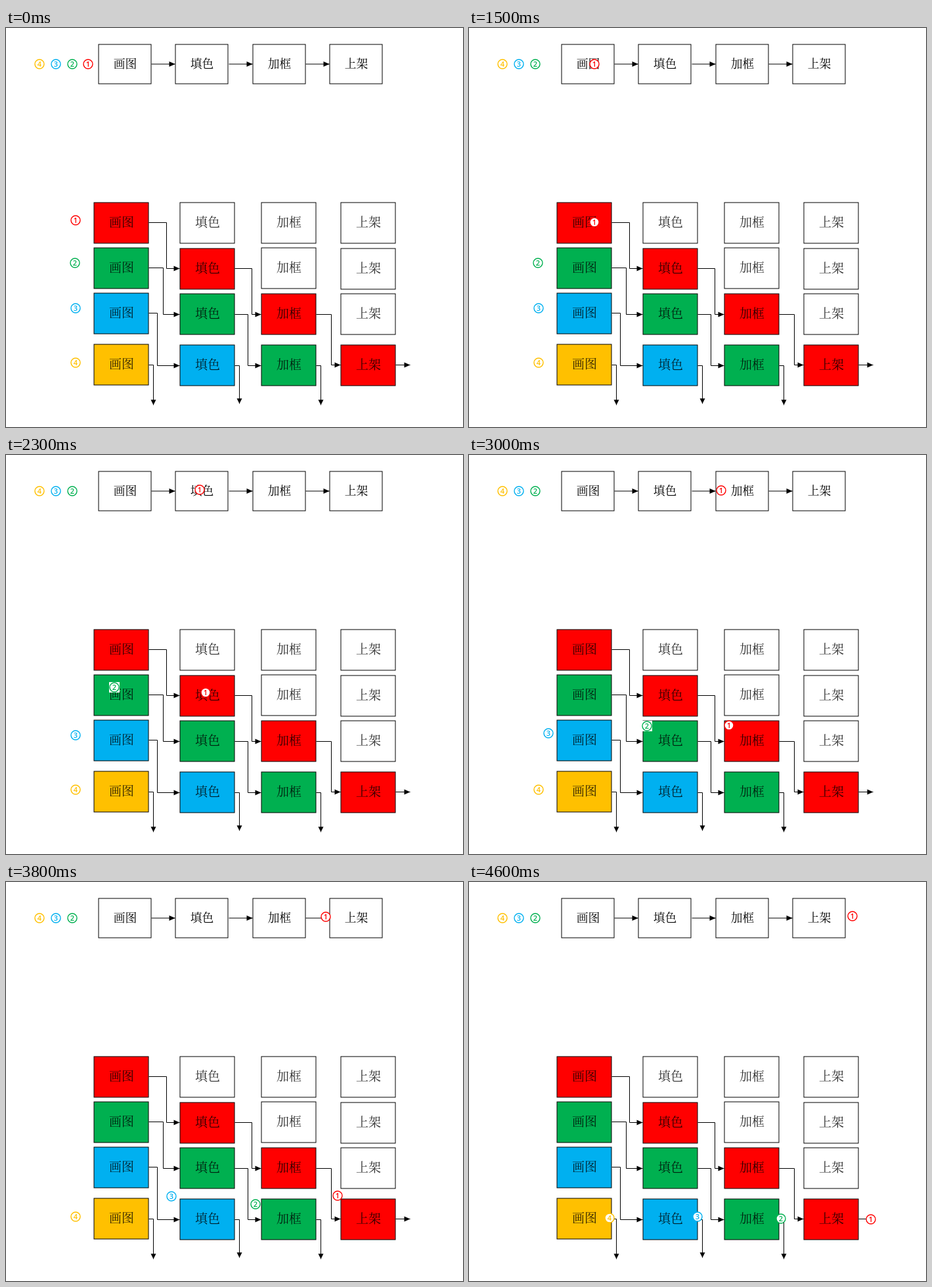
Animation of 696 by 608 pixels, one loop 6.1 s. Source, as an HTML page:

```html
<!DOCTYPE html>
<html lang="zh-CN">
<head>
<meta charset="utf-8">
<title>流水线</title>
<style>
  html, body { margin: 0; width: 100%; height: 100%; overflow: hidden; background: #fff; }
  svg { display: block; width: 696px; height: 608px; }
  .box { stroke: #000; stroke-width: 1; }
  .wire { fill: none; stroke: #000; stroke-width: 1; }
  .label {
    font-family: "Noto Serif CJK SC", "Noto Sans CJK SC", "Noto Sans CJK", serif;
    font-weight: 300; text-anchor: middle; fill: #000;
  }
  .lower { fill-opacity: .82; }
  .ring { fill: #fff; stroke-width: 1.4; }
  .digit { font: 600 11px "Open Sans", "Noto Sans", sans-serif; text-anchor: middle; }
</style>
</head>
<body>
<svg id="stage" viewBox="0 0 696 608"></svg>
<script>
const NS = "http://www.w3.org/2000/svg";
const stage = document.getElementById("stage");
const RED = "#ff0000", GREEN = "#00b050", BLUE = "#00b0f0", GOLD = "#ffc000";
const colors = [RED, GREEN, BLUE, GOLD];
const names = ["画图", "填色", "加框", "上架"];

function add(tag, attrs, parent = stage, text = "") {
  const el = document.createElementNS(NS, tag);
  for (const key in attrs) el.setAttribute(key, attrs[key]);
  el.textContent = text;
  parent.appendChild(el);
  return el;
}

function box(x, y, w, h, fill) {
  add("rect", { class: "box", x: x + .5, y: y + .5, width: w, height: h, fill });
}

function label(x, y, size, text, cls = "") {
  add("text", { class: "label " + cls, x, y: y + size * .38, "font-size": size }, stage, text);
}

// Polyline with a filled head at its last point
function arrow(points, len) {
  const [x, y] = points[points.length - 1];
  const down = points[points.length - 2][0] === x;
  const path = points.map(([px, py]) => `${px + .5},${py + .5}`).join(" ");
  add("polyline", { class: "wire", points: path });
  const turn = down ? " rotate(90)" : "";
  add("path", { d: `M0 0L${-len} -4V4Z`, transform: `translate(${x + .5} ${y + .5})${turn}` });
}

function elbow(x1, y1, mid, x2, y2) {
  arrow([[x1, y1], [mid, y1], [mid, y2], [x2, y2]], 9);
}

function badge(n, x, y) {
  const color = colors[n - 1];
  const g = add("g", { transform: `translate(${x} ${y})` });
  g.plate = add("rect", { x: -8, y: -8, width: 16, height: 16, fill: "#fff", visibility: "hidden" }, g);
  add("circle", { class: "ring", r: 7, stroke: color }, g);
  add("text", { class: "digit", y: 4, fill: color }, g, n);
  return g;
}

// Upper row
[141, 258, 376, 493].forEach((x, i) => {
  box(x - .5, 24.5, 80, 60, "#fff");
  label(x + 40.5, 54.5, 17.8, names[i]);
  if (i) arrow([[x - 37, 54.5], [x - 1, 54.5]], 9);
});

// Lower grid
const cols = [134, 265, 389, 510];
const rows = [[266, 335, 404, 482], [266, 336, 405, 483], [266, 335, 405, 483], [266, 336, 405, 483]];
cols.forEach((x, c) => rows[c].forEach((y, r) => {
  box(x - .5, y - .5, 83, 62, r < c ? "#fff" : colors[r - c]);
  label(x + 42, y + 30, 19, names[c], "lower");
}));

elbow(217, 296, 244, 264, 366);
elbow(348, 366, 374, 388, 436);
elbow(472, 436, 495, 509, 513);
elbow(217, 365, 239, 264, 436);
elbow(348, 436, 368, 388, 514);
elbow(217, 434, 230, 264, 514);
arrow([[593, 513], [615, 513]], 9);
arrow([[472, 514], [479, 514], [479, 574]], 8);
arrow([[348, 514], [355, 514], [355, 572]], 8);
arrow([[217, 513], [224, 513], [224, 574]], 8);

badge(2, 101, 55);
badge(3, 76, 55);
badge(4, 51, 55);

// Moving badges: number, then stops as [step, x, y]
const movers = [
  [1, [0, 125, 55], [4, 148, 55], [10, 191, 55], [18, 295, 53], [25, 384, 54], [33, 487, 53], [41, 584, 52]],
  [4, [33, 106, 510], [35, 136, 510], [41, 214, 512]],
  [3, [24, 106, 427], [25, 121, 424], [28, 170, 427], [33, 252, 479], [41, 348, 510]],
  [2, [14, 105, 358], [18, 165, 354], [25, 271, 413], [33, 380, 491], [41, 475, 513]],
  [1, [0, 106, 293], [4, 135, 288], [7, 165, 291], [10, 191, 296], [18, 304, 362], [25, 396, 412], [33, 505, 478], [41, 612, 514]]
].map(([n, ...stops]) => ({ n, stops, el: badge(n, stops[0][1], stops[0][2]) }));

function place(stops, step) {
  if (step <= stops[0][0]) return stops[0].slice(1);
  const i = stops.findIndex(s => s[0] >= step);
  const [a, ax, ay] = stops[i - 1], [b, bx, by] = stops[i];
  const k = (step - a) / (b - a);
  return [ax + (bx - ax) * k, ay + (by - ay) * k];
}

const LOOP = 6100, HOLD = 600, TICK = 100, LAST = 41;

function draw() {
  const t = performance.now() % LOOP;
  const step = Math.max(0, Math.min(LAST, Math.floor((t - HOLD) / TICK) + 1));
  for (const { n, stops, el } of movers) {
    const [x, y] = place(stops, step);
    el.setAttribute("transform", `translate(${x.toFixed(2)} ${y.toFixed(2)})`);
    if (n === 2) el.plate.setAttribute("visibility", step > 14 && step < 33 ? "visible" : "hidden");
  }
  requestAnimationFrame(draw);
}
draw();
</script>
</body>
</html>
```
